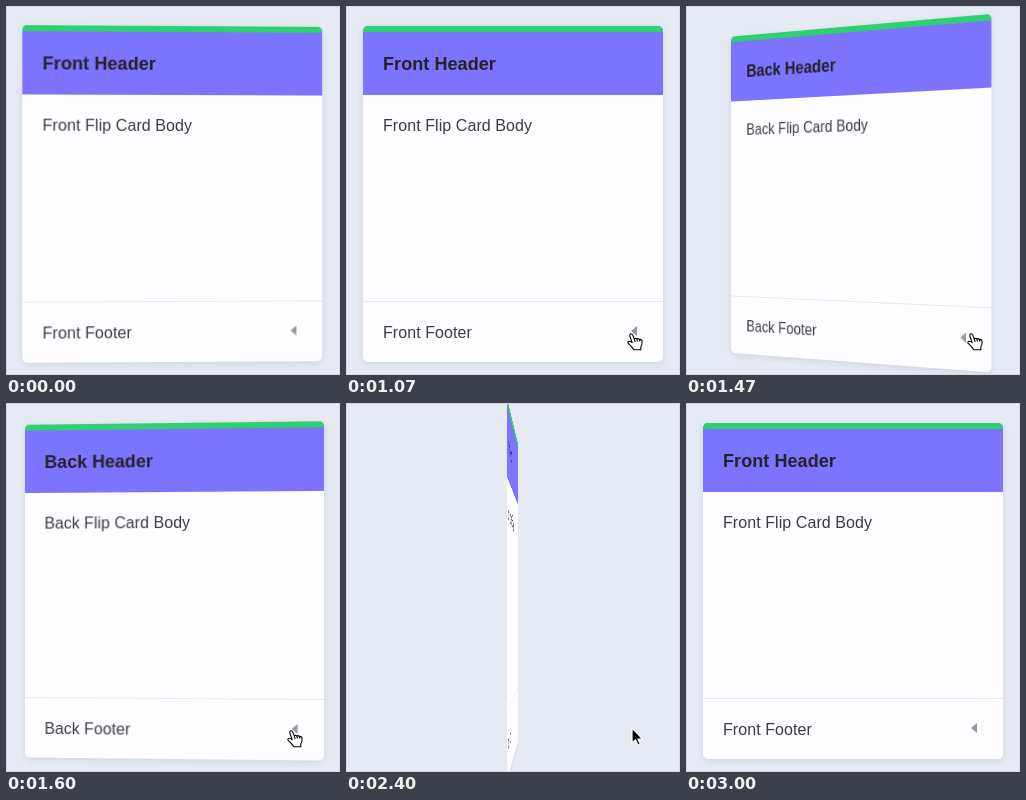
Animation of 334x369 px, one loop 3.34 s. Source, as an HTML page:

```html
<!DOCTYPE html>
<html lang="en">
<head>
<meta charset="utf-8">
<title>Flip card</title>
<style>
html, body { margin: 0; width: 100%; height: 100%; overflow: hidden; }
#stage {
  position: relative; width: 334px; height: 369px; overflow: hidden;
  background: #e6eaf3; perspective: 1200px; perspective-origin: 167px 200px;
  font: 16px/20px "Liberation Sans", Arial, sans-serif; letter-spacing: .07px; color: #3c3c40;
}
#stage::after {
  content: ""; position: absolute; inset: 0;
  box-shadow: inset 0 0 0 1px #d5d8e0;
}
#card {
  position: absolute; left: 17px; top: 20px; width: 300px; height: 336px;
  transform-style: preserve-3d;
}
.face {
  position: absolute; inset: 0; overflow: hidden; border-radius: 5px;
  background: #fefdff; box-shadow: 0 2px 6px rgba(50, 60, 100, .12);
  backface-visibility: hidden;
}
.back { transform: rotateY(180deg); }
.face > * { position: absolute; left: 0; right: 0; padding: 0 20px; white-space: nowrap; }
header {
  top: 0; height: 63px; border-top: 6px solid #2ed16f; background: #7c73ff;
  font: bold 18px/65px "Liberation Sans", Arial, sans-serif; color: #242428;
}
main { top: 90px; }
footer { top: 275px; height: 60px; line-height: 61px; border-top: 1px solid #e4e8ee; }
footer::after {
  content: ""; position: absolute; left: 268px; top: 24px;
  border: solid transparent; border-width: 5px 6px 5px 0; border-right-color: #98989e;
}
svg { position: absolute; left: 0; top: 0; z-index: 1; }
</style>
</head>
<body>
<div id="stage">
  <div id="card">
    <div class="face">
      <header>Front Header</header>
      <main>Front Flip Card Body</main>
      <footer>Front Footer</footer>
    </div>
    <div class="face back">
      <header>Back Header</header>
      <main>Back Flip Card Body</main>
      <footer>Back Footer</footer>
    </div>
  </div>
  <svg width="334" height="369">
    <g id="cursor" stroke-linejoin="round">
      <path id="arrow" d="M0 0V15L3.5 11.8L6 17.3L8.3 16.3L5.9 11H10.6Z" stroke="#fff" stroke-width="1.2"/>
      <path id="hand" transform="translate(-5 2)" fill="#fff" stroke="#000" stroke-width="1.1"
        d="M5.2 9.6L2.8 3Q2.4 1.2 3.7 .8T5.7 1.9L7.2 5.9Q8.6 4.7 9.8 6Q11.2 5 12.4 6.5Q14.4 6 15 8Q15.6 11.5 13.8 14V16.8H7L4.2 13.4L1 10.2Q.4 8.6 2 8.2Q3.6 8.3 5.2 9.6ZM7.2 5.9l1 3M9.8 6l.7 2.5M12.4 6.5l.5 2"/>
    </g>
  </svg>
</div>
<script>
const LOOP = 3340, STEP = 1000 / 15;
const byId = id => document.getElementById(id);
const card = byId('card'), cursor = byId('cursor'), arrow = byId('arrow'), hand = byId('hand');
const ramp = (t, start, length) => Math.min(1, Math.max(0, (t - start) / length));
const show = (el, on) => el.setAttribute('visibility', on ? 'visible' : 'hidden');

// The CSS "ease" curve, solved for its parameter by bisection
function ease(x) {
  let lo = 0, hi = 1;
  for (let i = 0; i < 24; i++) {
    const s = (lo + hi) / 2;
    if (.75 * s - .75 * s * s + s ** 3 < x) lo = s; else hi = s;
  }
  const r = 1 - lo;
  return .3 * lo * r * r + 3 * lo * lo * r + lo ** 3;
}

function angle(t) {
  if (t < 1000) return 180 * (1 - ease(ramp(t, -478, 560)));
  if (t < 2000) return 180 * ease(ramp(t, 1199, 503));
  return 180 * (1 - ease(ramp(t, 2228, 575)));
}

function draw(t) {
  card.style.transform = `rotateY(${angle(t)}deg)`;
  const enter = ramp(t, 667, 400), leave = ramp(t, 2733, 267) ** 2;
  const glide = enter * enter * (3 - 2 * enter);
  cursor.setAttribute('transform',
    `translate(${336 - 50 * glide + 40 * leave} ${322 + 3 * glide})`);
  const visible = t > 700 && t < 2990, pointing = t > 990 && t < 2330;
  show(arrow, visible && !pointing);
  show(hand, visible && pointing);
}

const start = performance.now();
function tick() {
  const t = (performance.now() - start) % LOOP;
  draw(Math.floor((t + 4) / STEP) * STEP);
  requestAnimationFrame(tick);
}
tick();
</script>
</body>
</html>
```
